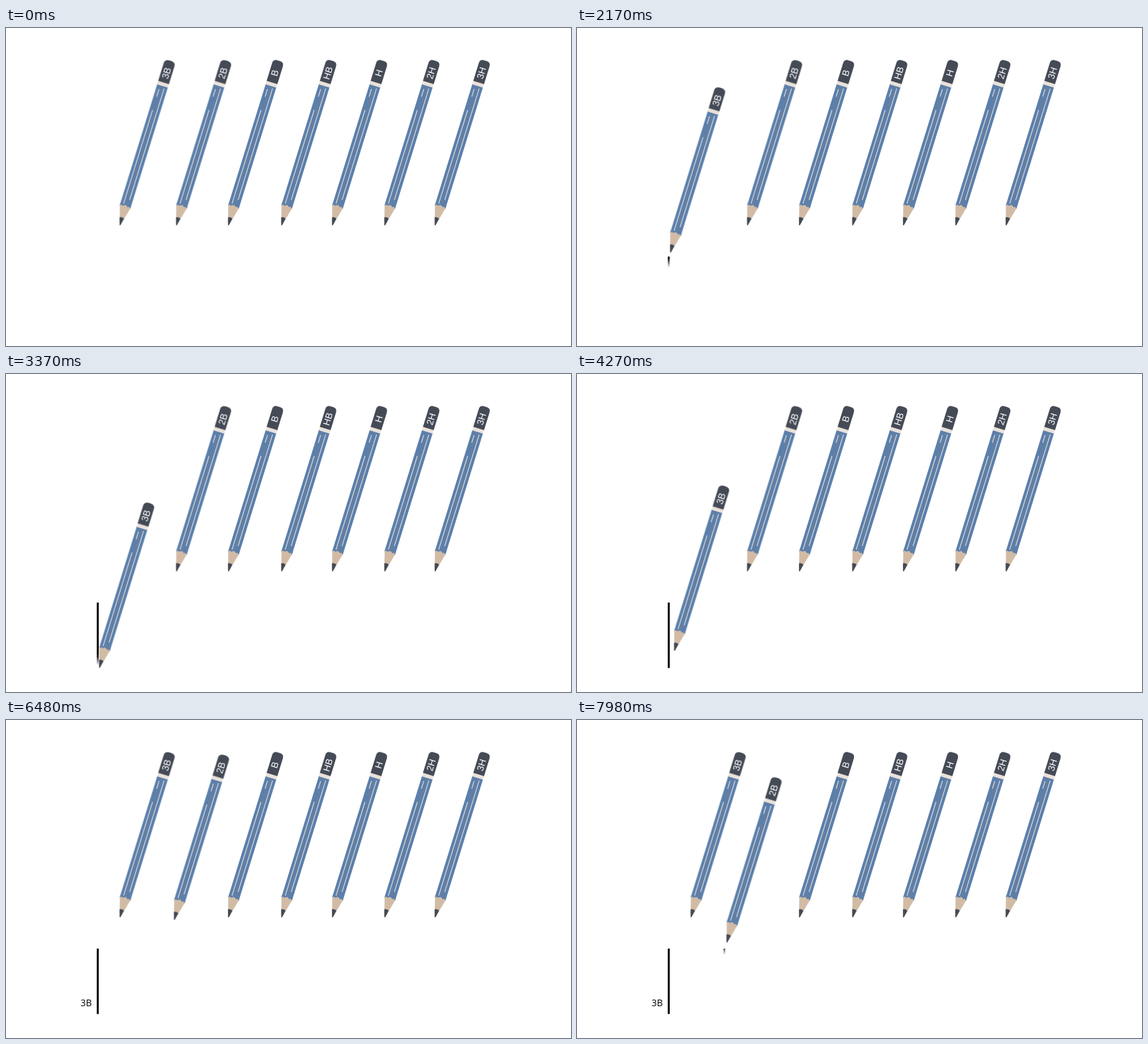
Animation of 853x480 px, one loop 8000 ms. Source, as an HTML page:

```html
<!DOCTYPE html>
<html lang="en">
<head>
<meta charset="utf-8">
<title>Pencil grades</title>
<style>
  html, body { margin: 0; width: 100%; height: 100%; overflow: hidden; background: #fff; }
  svg { display: block; width: 853px; height: 480px; }

  .grade { font: 14px "Liberation Sans", Arial, sans-serif; fill: #fff; text-anchor: middle; }
  .caption { font: 14px "Open Sans", "Noto Sans", sans-serif; fill: #000; }

  .soft, .medium { animation: 8s cubic-bezier(.455, .03, .515, .955) infinite; }
  .ink, .caption { animation: 8s linear infinite; }
  .soft { animation-name: draw-soft; }
  .medium { animation-name: draw-medium; }
  .ink.first { animation-name: wipe-first; }
  .ink.second { animation-name: wipe-second; }
  .caption { animation-name: appear; }

  /* move to the start, draw down, return home; each leg eases in and out */
  @keyframes draw-soft {
    0%, 67.2%, 100% { transform: translate(0, 0); }
    22.25%, 24.95% { transform: translate(-31px, 38px); }
    44.4%, 47.3% { transform: translate(-31px, 149px); }
  }
  @keyframes draw-medium {
    0%, 76.7% { transform: translate(0, 0); }
    96.1%, 100% { transform: translate(-31px, 38px); }
  }
  @keyframes wipe-first {
    0%, 23.94% { transform: translateY(-114px); }
    45.86%, 100% { transform: translateY(0); }
  }
  @keyframes wipe-second {
    0%, 97.94% { transform: translateY(-114px); }
    100% { transform: translateY(-103.3px); }
  }
  @keyframes appear {
    0%, 74.99% { opacity: 0; }
    75%, 100% { opacity: 1; }
  }
</style>
</head>
<body>
<svg viewBox="0 0 853 480">
  <defs>
    <linearGradient id="edge" x1="0" y1="0" x2="0" y2="1">
      <stop offset="0" stop-color="#000"/>
      <stop offset="1" stop-color="#000" stop-opacity="0"/>
    </linearGradient>
    <clipPath id="slot"><rect x="0" y="0" width="3" height="98.5"/></clipPath>
    <g id="stroke">
      <rect width="3" height="98.5"/>
      <rect y="98.5" width="3" height="15.5" fill="url(#edge)"/>
    </g>
    <!-- the point sits at the origin and the pencil rises along -y -->
    <g id="pencil">
      <path fill="#d2bba5" d="M-8.4-33H8.4V-29.5L1.4-.4H.2L-8.4-29.5Z"/>
      <path fill="#444a55" d="M-3.3-11.5Q0-13.6 3.7-11.5L1.5-.5L.4 0Z"/>
      <path fill="#5b7fab" d="M-8.4-221H8.4V-28.5Q6.2-32 3.6-29.5Q0-34-3.6-29.5Q-6.2-32-8.4-28.5Z"/>
      <path fill="#617fa5" d="M-3-221H3V-31Q0-33.5-3-31Z"/>
      <path fill="none" stroke="#e6e4e1" stroke-width="1.1" d="M-3.6-214V-202M-3.6-181V-33M3.5-217V-41"/>
      <path fill="#e9e1da" d="M-8.5-226H8.5V-220H-8.5Z"/>
      <path fill="#454b56" d="M-8.5-225.5V-253.5Q-8.5-260-1.5-260H1.5Q8.5-260 8.5-253.5V-225.5Z"/>
    </g>
  </defs>

  <g transform="translate(137 345)" clip-path="url(#slot)"><use href="#stroke" class="ink first"/></g>
  <g transform="translate(221 345)" clip-path="url(#slot)"><use href="#stroke" class="ink second"/></g>
  <text class="caption" x="112.5" y="432">3B</text>
  <g id="row"></g>
</svg>
<script>
  const pencils = [
    ["3B", 0, "soft"], ["2B", 85.2, "medium"], ["B", 163.7], ["HB", 244],
    ["H", 320.7], ["2H", 399.7], ["3H", 475.7]
  ];
  document.getElementById("row").innerHTML = pencils.map(([grade, x, motion = ""]) => `
    <g class="${motion}">
      <g transform="translate(${171.2 + x} 297.7) rotate(17.2)">
        <use href="#pencil"/>
        <text class="grade" transform="translate(4.6 -240.4) rotate(-90)">${grade}</text>
      </g>
    </g>`).join("");
</script>
</body>
</html>
```
